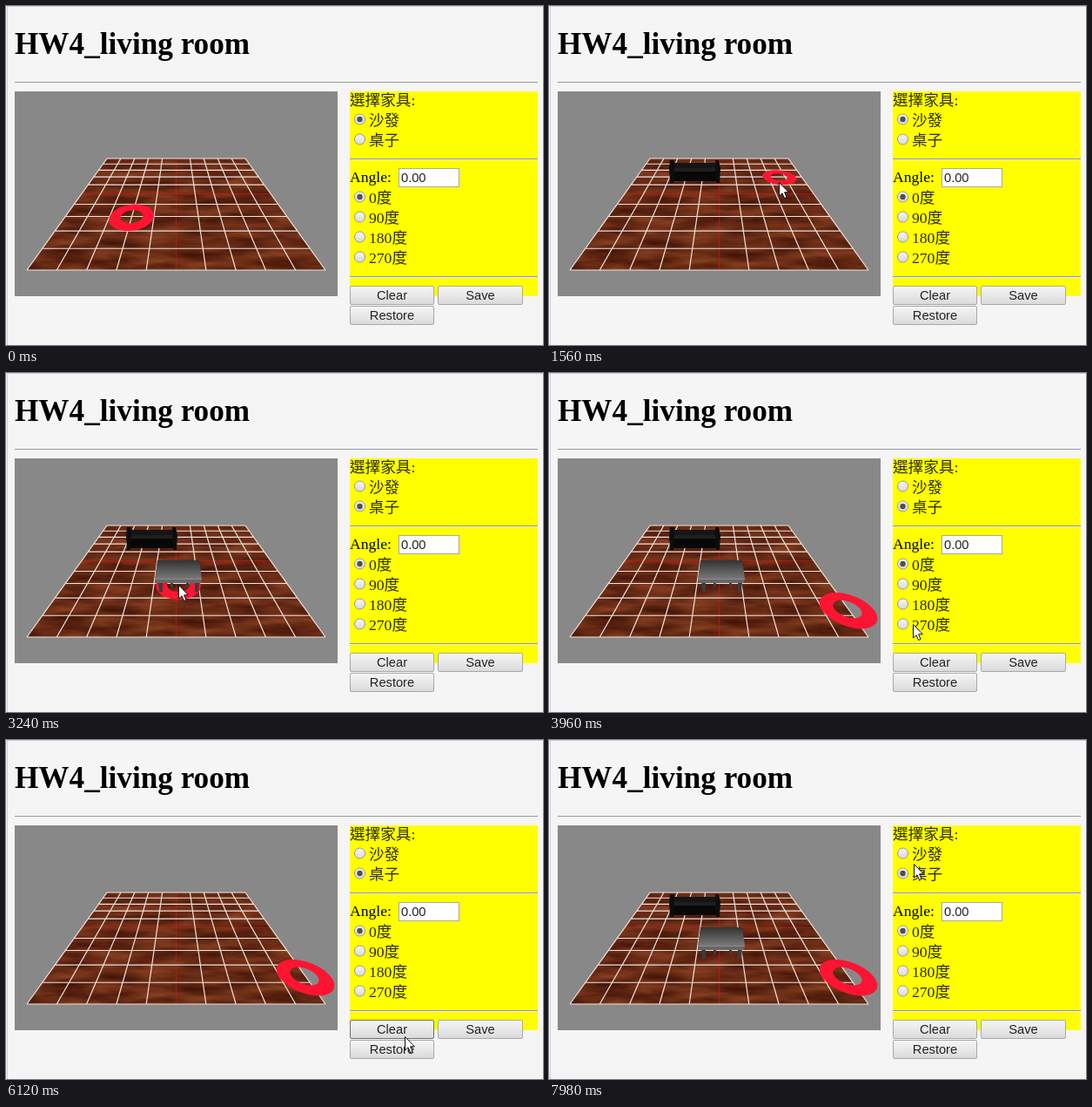
Recreate the animation shown at these times as an HTML page. Size 617x389 px, loop 8 s.

```html
<!DOCTYPE html>
<html lang="zh-Hant">
<head>
<meta charset="utf-8">
<title>HW4_living room</title>
<style>
  html, body { margin: 0; width: 100%; height: 100%; overflow: hidden; background: #f5f5f5; }
  svg { display: block; }
  text { font: 300 17.6px "Liberation Serif", "Noto Sans CJK TC", "Noto Sans CJK", serif; }
  .title { font-weight: bold; font-size: 35.2px; }
  .label { fill: #2c2c00; }
  .ui { font: 14.67px "Liberation Sans", sans-serif; fill: #222; }
</style>
</head>
<body>
<svg id="stage" width="617" height="389" viewBox="0 0 617 389">
  <defs>
    <filter id="wood" x="0" y="0" width="1" height="1" color-interpolation-filters="sRGB">
      <feTurbulence type="fractalNoise" baseFrequency=".02 .1" numOctaves="3" seed="7"/>
      <feColorMatrix values=".38 0 0 0 .21  .24 0 0 0 .045  .14 0 0 0 .01  0 0 0 0 1"/>
      <feComposite in2="SourceGraphic" operator="in"/>
    </filter>
    <linearGradient id="face" x2="0" y2="1"><stop stop-color="#f6f6f6"/><stop offset="1" stop-color="#dadada"/></linearGradient>
    <linearGradient id="faceDown" x2="0" y2="1"><stop stop-color="#d4d4d4"/><stop offset="1" stop-color="#e4e4e4"/></linearGradient>
    <linearGradient id="tabletop" x2="0" y2="1"><stop stop-color="#333"/><stop offset="1" stop-color="#787878"/></linearGradient>
    <clipPath id="view"><rect x="10" y="98" width="371" height="235"/></clipPath>
  </defs>

  <rect width="617" height="389" fill="#f5f5f5"/>
  <path d="M0 .5H617M1.5 0V389" stroke="#c5d3da"/>
  <text class="title" x="10" y="55">HW4_living room</text>
  <path d="M10 87.5H611" stroke="#999"/>

  <g clip-path="url(#view)">
    <rect x="10" y="98" width="371" height="235" fill="#888"/>
    <path d="M116 175H275L367 303H24Z" filter="url(#wood)"/>
    <path id="axes" stroke="#d01414" stroke-opacity=".7"/>
    <path id="grid" fill="none" stroke="#f0e4dd" stroke-width="1.2"/>
    <path id="ring" fill="#ff1432" fill-rule="evenodd"/>
    <g id="sofa">
      <path d="M140 180H195V190H140Z" fill="#151515"/>
      <path d="M143 186H192L193 191H142Z" fill="#1f1f1f"/>
      <path d="M140 190H195V201H140Z" fill="#080808"/>
      <path d="M139 177H144V185L143 203H139L138 186ZM191 177H195L197 186 196 203H192Z" fill="#0d0d0d"/>
    </g>
    <g id="table">
      <path d="M175 239H180V251H176ZM217 239H222L221 251H217ZM189 240H192V246H189ZM207 240H210V246H207Z" fill="#3c3c3c"/>
      <path d="M174 215H222L225 236H171Z" fill="url(#tabletop)"/>
      <path d="M171 236H225L224 241H172Z" fill="#666"/>
      <path d="M171 236.5H225" stroke="#8b8b8b"/>
    </g>
  </g>

  <rect x="395" y="98" width="216" height="235" fill="#ff0"/>
  <path d="M395 175.5H611M395 310.5H611" stroke="#999"/>
  <path d="M395 176.5H611M395 311.5H611" stroke="#eee"/>
  <text class="label" x="395" y="114">選擇家具:</text>
  <text x="395" y="202">Angle:</text>
  <rect x="451.5" y="186.5" width="69" height="21" fill="#fff" stroke="#a9a9a9"/>
  <text class="ui" x="454" y="202">0.00</text>
  <g id="controls"></g>
  <path id="cursor" d="M.5 .5V16L4 12.8 6.5 18.5 9 17.5 6.6 11.8H11.3Z" fill="#fff" stroke="#111" stroke-linejoin="round"/>
</svg>
<script>
const LOOP = 8000, TICK = 60, CELLS = 10;
const floor = { top: 175, bottom: 303, left: 24, right: 367, inset: 92, depth: 1.157 };
const $ = id => document.getElementById(id);

function add(parent, tag, attrs, text = '') {
  const el = document.createElementNS('http://www.w3.org/2000/svg', tag);
  for (const name in attrs) el.setAttribute(name, attrs[name]);
  el.textContent = text;
  return parent.appendChild(el);
}

// Left edge and width of the floor at a height, 0 for the front and 1 for the back
function row(g) {
  return [floor.left + floor.inset * g, floor.right - floor.left - 2 * floor.inset * g];
}

function project(u, v) {
  const k = v / CELLS, g = k * (1 + floor.depth) / (1 + floor.depth * k);
  const [left, width] = row(g);
  const y = floor.bottom - (floor.bottom - floor.top) * g;
  return `${(left + width * u / CELLS).toFixed(2)} ${y.toFixed(2)}`;
}

function unproject(x, y) {
  const g = (floor.bottom - y) / (floor.bottom - floor.top);
  const [left, width] = row(g);
  return [CELLS * (x - left) / width, CELLS * g / (1 + floor.depth - floor.depth * g)];
}

function circle(u, v, r) {
  const points = Array.from({ length: 48 }, (_, i) => {
    const a = i * Math.PI / 24;
    return project(u + r * Math.cos(a), v + r * Math.sin(a));
  });
  return `M${points.join('L')}Z`;
}

const gridLine = i => `M${project(i, 0)}L${project(i, CELLS)}M${project(0, i)}L${project(CELLS, i)}`;
const indices = [...Array(CELLS + 1).keys()];
$('grid').setAttribute('d', indices.filter(i => i !== CELLS / 2).map(gridLine).join(''));
$('axes').setAttribute('d', gridLine(CELLS / 2));

const controls = $('controls');
function radio(y, label) {
  add(controls, 'circle', { cx: 406.5, cy: y, r: 6, fill: 'url(#face)', stroke: '#999' });
  const dot = add(controls, 'circle', { cx: 406.5, cy: y, r: 3.2, fill: '#505050' });
  add(controls, 'text', { class: 'label', x: 417, y: y + 7 }, label);
  return on => dot.setAttribute('visibility', on ? 'visible' : 'hidden');
}
function button(x, y, w, label) {
  const box = add(controls, 'rect', { x: x + .5, y: y + .5, width: w - 1, height: 21, rx: 1.5 });
  add(controls, 'text', { class: 'ui', x: x + w / 2, y: y + 16, 'text-anchor': 'middle' }, label);
  return (cx, cy, down) => {
    const hover = cx >= x && cx < x + w && cy >= y && cy < y + 22;
    box.setAttribute('fill', down ? 'url(#faceDown)' : 'url(#face)');
    box.setAttribute('stroke', hover ? '#707070' : '#a8a8a8');
  };
}

const pickSofa = radio(130, '沙發'), pickTable = radio(153, '桌子');
['0度', '90度', '180度', '270度'].forEach((label, i) => radio(219 + 23 * i, label)(i === 0));
const clear = button(395, 321, 97, 'Clear');
const save = button(496, 321, 98, 'Save');
const restore = button(395, 344, 97, 'Restore');

const APPEAR = 300, entry = { x: 462, y: 110 };
const moves = [
  { from: 240, to: 780, x: 170, y: 201, sag: 0 },
  { from: 1200, to: 2040, x: 410, y: 150, sag: 22 },
  { from: 2280, to: 3060, x: 198, y: 243, sag: 0 },
  { from: 3600, to: 4200, x: 538, y: 332, sag: -14 },
  { from: 4920, to: 5520, x: 457, y: 332, sag: 0 },
  { from: 5940, to: 6360, x: 460, y: 352, sag: 0 },
  { from: 7200, to: 7980, x: 419, y: 142, sag: 0 }
];

function cursorAt(t) {
  let { x, y } = entry;
  for (const m of moves) {
    const p = Math.min(1, Math.max(0, (t - m.from) / (m.to - m.from)));
    const k = p * p * (3 - 2 * p);
    x += (m.x - x) * k;
    y += (m.y - y) * k + m.sag * 4 * k * (1 - k);
  }
  return [x, y];
}

// The ring follows the pointer over the floor and stays where the pointer left it
function ringAt(t) {
  for (; t >= APPEAR; t -= 10) {
    const [x, y] = cursorAt(t);
    const [u, v] = unproject(x, 1.14 * y - 34);
    if (u >= 0 && u <= 10.1 && v >= 0 && v <= CELLS) return [u, v];
  }
  return [3, 3];
}

const within = (t, from, to) => t >= from && t < to;
const show = (id, on) => $(id).setAttribute('visibility', on ? 'visible' : 'hidden');

function draw(t) {
  const [x, y] = cursorAt(t).map(Math.round);
  const [u, v] = ringAt(t);
  const cleared = within(t, 5760, 6780);

  $('cursor').setAttribute('transform', `translate(${x} ${y})`);
  $('ring').setAttribute('d', circle(u, v, 1) + circle(u, v, .5));
  show('cursor', t >= APPEAR);
  show('sofa', t >= 1260 && !cleared);
  show('table', t >= 3240 && !cleared);
  pickSofa(t < 2340);
  pickTable(t >= 2340);
  save(x, y, within(t, 4560, 4680));
  clear(x, y, within(t, 5700, 5760));
  restore(x, y, within(t, 6660, 6780));
}

const start = performance.now();
let drawn = -1;
function frame() {
  const t = Math.floor((performance.now() - start) % LOOP / TICK) * TICK;
  if (t !== drawn) draw(drawn = t);
  requestAnimationFrame(frame);
}
frame();
</script>
</body>
</html>
```
